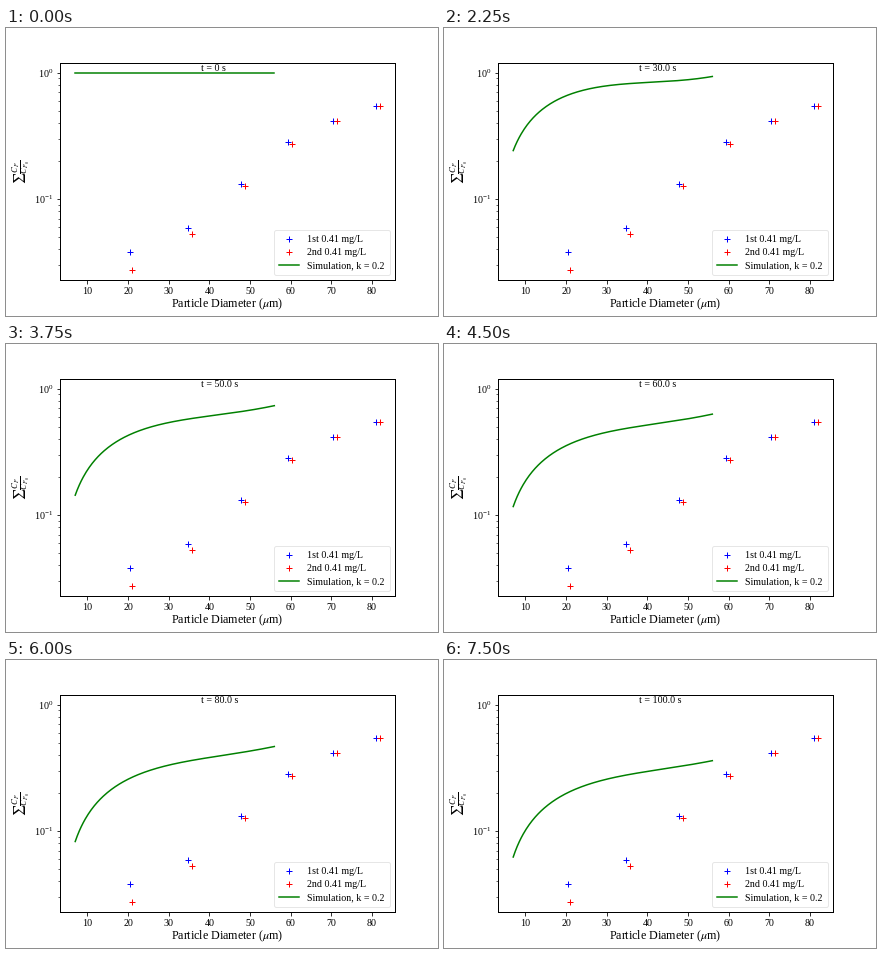
These frames come from a looping animation (432x288 px, 8000 ms). A matplotlib script:

```python
import numpy as np
import matplotlib.pyplot as plt
from matplotlib.animation import FuncAnimation

plt.rcParams.update({
    "font.family": "Liberation Serif",
    "mathtext.fontset": "stix",
    "font.size": 10,
    "axes.labelsize": 12,
    "axes.labelpad": 1,
    "axes.linewidth": 1,
    "figure.subplot.bottom": 0.125,
})

INTERVAL = 250      # ms per frame
FRAMES = 32
HOLD = 3            # frames per simulation step
STEP = 10.0         # seconds per simulation step

# Measured points: (diameter, concentration ratio)
first_run = [(20.6, 0.0379), (34.8, 0.0589), (47.7, 0.1325),
             (59.4, 0.2825), (70.5, 0.418), (81.0, 0.541)]
second_run = [(21.0, 0.02735), (35.8, 0.0527), (48.7, 0.1256),
              (60.4, 0.272), (71.5, 0.415), (81.9, 0.541)]

# Decay parameters at a few diameters
nodes = np.array([7, 20, 40, 56])
tau = np.array([20, 28, 38.7, 44.8])
sharpness = np.array([1, 2.3, 2.8, 3.7])
power = np.array([1.55, 1.25, 1.25, 1.25])
diam = np.linspace(nodes[0], nodes[-1], 200)


def simulate(t):
    """Cubic over diameter through ratios that stay near 1, then decay."""
    ratio = (1 + (t / tau) ** sharpness) ** (-power / sharpness)
    return np.polyval(np.polyfit(nodes, ratio, 3), diam)


def padded(low, high, pad=0.05):
    margin = pad * (high - low)
    return low - margin, high + margin


fig, ax = plt.subplots(figsize=(6, 4), dpi=72)
ax.set_yscale("log")
ax.set_xlim(*padded(nodes[0], second_run[-1][0]))
ax.set_ylim(*10 ** np.array(padded(np.log10(second_run[0][1]), np.log10(1.0045))))
ax.set_xlabel(r"Particle Diameter ($\mu$m)")
ax.set_ylabel(r"$\sum \frac{C_P}{C_{P_0}}$")

ax.plot(*zip(*first_run), "b+", label="1st 0.41 mg/L")
ax.plot(*zip(*second_run), "r+", label="2nd 0.41 mg/L")
curve, = ax.plot([], [], "g", label="Simulation, k = 0.2")
clock = ax.text(38, 1.03, "")
ax.legend(loc="lower right", labelspacing=0.4, borderpad=0.5, edgecolor="0.88")


def update(frame):
    t = frame // HOLD * STEP
    curve.set_data(diam, simulate(t))
    clock.set_text(f"t = {t or 0} s")
    return curve, clock


def init():
    return update(0)


anim = FuncAnimation(fig, update, frames=FRAMES, init_func=init,
                     interval=INTERVAL, repeat=True, repeat_delay=0)
plt.show()
```
